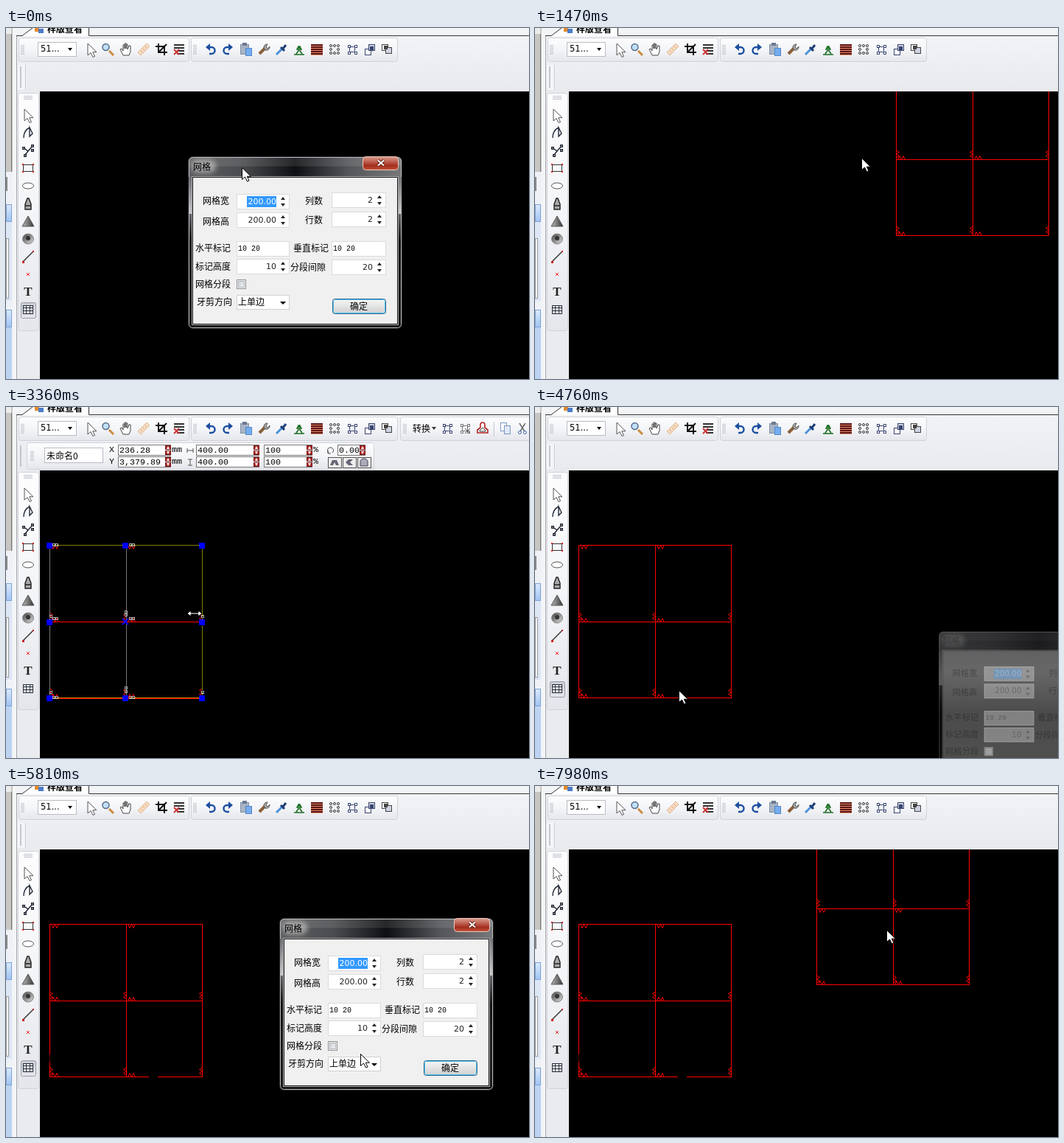
These frames come from a looping animation (710 by 476 pixels, 8 s). An HTML page with a canvas:

```html
<!DOCTYPE html>
<html lang="zh">
<head>
<meta charset="utf-8">
<style>
html, body { margin: 0; width: 100%; height: 100%; overflow: hidden; background: #000; }
canvas { display: block; }
</style>
</head>
<body>
<canvas id="stage" width="710" height="476"></canvas>
<script>
const g = document.getElementById('stage').getContext('2d');
const LOOP = 8000, STEP = 70;
const CJK = '12px "Noto Sans CJK SC", "Noto Sans CJK", sans-serif';
const NUM = '11px "DejaVu Sans", sans-serif';
const MONO = '11.7px "Liberation Mono", monospace';
const SMALL = '10px "Liberation Mono", monospace';
const RED = '#f00', BLUE = '#3399ff', INK = '#222a38';

// pointer keys: time, x, y
const KEYS = [
  [0, 320, 189], [210, 352, 290], [350, 376, 372], [490, 401, 435], [630, 450, 400],
  [770, 479, 380], [1120, 479, 380], [1260, 463, 345], [1400, 447, 260], [1470, 443, 176],
  [1680, 470, 190], [1960, 590, 263], [2030, 590, 263], [2310, 594, 177], [2380, 594, 177],
  [2940, 162, 289], [3290, 162, 289], [3360, 256, 280], [3500, 382, 269], [3780, 382, 269],
  [4200, 240, 400], [4340, 150, 419], [4550, 23, 377], [4620, 23, 377], [4760, 195, 384],
  [5040, 450, 350], [5320, 590, 312], [5390, 590, 312], [5670, 422, 194], [5810, 481, 363],
  [6160, 500, 375], [6300, 500, 375], [6580, 478, 412], [6930, 478, 412], [7350, 603, 383],
  [7770, 601, 382], [7980, 477, 195], [8000, 477, 195]
];

const clamp = v => Math.max(0, Math.min(1, v));
const span = (t, a, b) => clamp((t - a) / (b - a));
const within = (t, a, b) => t >= a && t < b;

function pointerAt(t) {
  const i = KEYS.findIndex(k => k[0] > t);
  const a = KEYS[i - 1], b = KEYS[i], f = span(t, a[0], b[0]);
  return [a[1] + (b[1] - a[1]) * f, a[2] + (b[2] - a[2]) * f].map(Math.round);
}

function box(x, y, w, h, fill, edge) {
  if (fill) { g.fillStyle = fill; g.fillRect(x, y, w, h); }
  if (edge) { g.strokeStyle = edge; g.lineWidth = 1; g.strokeRect(x + .5, y + .5, w - 1, h - 1); }
}
function round(x, y, w, h, r, fill, edge) {
  g.beginPath();
  g.roundRect(x + .5, y + .5, w - 1, h - 1, r);
  if (fill) { g.fillStyle = fill; g.fill(); }
  if (edge) { g.strokeStyle = edge; g.lineWidth = 1; g.stroke(); }
}
function blend(x0, y0, x1, y1, ...colors) {
  const b = g.createLinearGradient(x0, y0, x1, y1);
  colors.forEach((c, i) => b.addColorStop(i / (colors.length - 1), c));
  return b;
}
function text(s, x, y, font = CJK, color = '#000', align = 'left') {
  g.font = font; g.fillStyle = color; g.textAlign = align; g.textBaseline = 'middle';
  g.fillText(s, x, y);
}
// path drawn around a centre point
function path(x, y, d, edge, fill, w = 1) {
  const p = new Path2D(d);
  g.save();
  g.translate(x, y);
  if (fill) { g.fillStyle = fill; g.fill(p); }
  if (edge) { g.strokeStyle = edge; g.lineWidth = w; g.stroke(p); }
  g.restore();
}
const tri = (x, y, up, c = '#000', s = 3) =>
  path(x, y, up ? `M${-s} 2L0 -2L${s} 2Z` : `M${-s} -2L0 2L${s} -2Z`, null, c);

const ARROW = 'M0 0V16L4 12.5L7 18.5L9.5 17.5L6.8 11.7H12Z';

function panel(x, y, w, h) {
  round(x, y, w, h, 3, blend(0, y, 0, y + h, '#fdfdfe', '#f4f5f8', '#e4e6eb'), '#cfd2d9');
}
function gripV(x, y, h) {
  for (let i = 0; i < h; i += 2) box(x, y + i, 5, 1, '#c3c6ce');
}

function squares(x, y, c) {
  for (const dx of [-6, 3]) for (const dy of [-6, 3]) box(x + dx, y + dy, 4, 4, '#fff', c);
  round(x - 4, y - 4, 8, 8, 1, null, c);
}
function stack(x, y, c, flip) {
  box(x - 7, y + (flip ? -7 : -1), 9, 9, '#fff', c);
  box(x - 2, y + (flip ? -3 : -7), 9, 9, '#cdd3e0', c);
  box(x + (flip ? -4 : 0), y + (flip ? -5 : -4), 5, 5, c);
}

function topIcons() {
  path(111, 21, ARROW, '#555', '#fff');
  path(138, 29, 'M2 2L8 8', '#c98b3d', null, 3);
  path(138, 29, 'M-7 -3A4.500 4.500 0 1 1 2 -3A4.500 4.500 0 1 1 -7 -3Z', '#5a6c88', '#bfe0fa', 1.5);
  path(163, 29, 'M-4 8L-8 0L-6 -1L-4 2V-6H-2V-1V-8H0V-1V-7H2V0L4 -5H6V3L4 8Z', '#444', '#fff');
  path(187, 29, 'M-8 4L4 -8L8 -4L-4 8Z', '#e0b48c', '#f6dcc4');
  path(187, 29, 'M-4 2L-2 4M-1 -1L1 1M2 -4L4 -2', '#d8a070');
  path(211, 29, 'M-4 -8V4H8M-8 -4H4V8M-3 3L7 -7', '#111', null, 2);
  path(235, 29, 'M-7 -6H7M-7 -2H7M-3 2H7M-3 6H7', '#333', null, 2);
  path(235, 29, 'M-7 0L0 7M0 0L-7 7', '#c33', null, 2);
  path(278, 29, 'M-4 -3H1A4.500 4.500 0 0 1 1 6H-2', '#1c4fa0', null, 2.4);
  path(278, 29, 'M-7 -3L-1 -8V2Z', null, '#1c4fa0');
  path(301, 29, 'M4 -3H-1A4.500 4.500 0 0 0 -1 6H2', '#1c4fa0', null, 2.4);
  path(301, 29, 'M7 -3L1 -8V2Z', null, '#1c4fa0');
  box(318, 22, 12, 14, '#a8b4c4', '#8391a6');
  box(321, 20, 6, 4, '#6d7a90');
  box(325, 27, 9, 11, '#74aef0', '#5588c8');
  path(350, 29, 'M-6 6L2 -2', '#8a6038', null, 4);
  path(350, 29, 'M0 -2A4.500 4.500 0 0 1 5 -7L3 -3L5 -1L8 -4A4.500 4.500 0 0 1 2 1Z', '#555', '#aaa');
  path(374, 29, 'M-7 7L1 -1', '#4a90dc', null, 3);
  path(374, 29, 'M-1 -3L4 2M2 -1L6 -6', '#1d3f78', null, 3);
  path(398, 30, 'M-7 6H7M-4 5L-1 1V-5H1V1L4 5', '#176b1f', null, 1.6);
  path(398, 30, 'M-3 0A3 4 0 0 1 3 0', '#176b1f', null, 1.6);
  for (let y = 22; y < 37; y += 3) { box(414, y, 16, 2, '#5a1414'); box(414, y + 2, 16, 1, '#e38b6a'); }
  for (const dx of [-5, 0, 5]) for (const dy of [-5, 0, 5])
    if (dx || dy) round(446 + dx - 2, 29 + dy - 2, 4, 4, 2, null, '#333');
  squares(470, 29, '#38446e');
  stack(494, 29, '#38446e');
  stack(517, 29, '#444', true);
}

function sideIcons(active) {
  path(25, 110, ARROW, '#555', '#fff');
  path(30, 142, 'M-6 7C-6 -1 -2 -5 2 -7M2 -7V5L6 1Z', INK, null, 1.4);
  path(30, 166, 'M-7 -4L0 1L6 -6M0 1L-5 7', INK, null, 1.5);
  for (const [x, y] of [[22, 161], [34, 158], [34, 164], [24, 171]]) box(x, y, 4, 4, '#777', INK);
  box(23, 185, 14, 10, null, '#333');
  for (const x of [22, 36]) { box(x, 184, 2, 2, '#c22'); box(x, 194, 2, 2, '#c22'); }
  path(30, 214, 'M-7.500 0A7.500 4 0 1 1 7.500 0A7.500 4 0 1 1 -7.500 0Z', '#555', '#fff');
  path(30, 238, 'M-4 8V1L-1 -7H1L4 1V8ZM-4 3H4', '#222', '#aaa', 1.4);
  path(30, 262, 'M-8 7L0 -7L8 7Z', '#555', blend(-8, 0, 8, 0, '#bbb', '#333'));
  path(30, 286, 'M-7.500 0A7.500 7 0 1 1 7.500 0A7.500 7 0 1 1 -7.500 0Z', '#888', blend(-7, -7, 7, 7, '#444', '#ddd'));
  path(30, 285, 'M-3 0A3 3 0 1 1 3 0A3 3 0 1 1 -3 0Z', null, '#333');
  path(30, 310, 'M-7 7L7 -7', '#333', null, 1.4);
  box(22, 316, 3, 3, '#c22'); box(36, 302, 2, 2, '#c22');
  path(30, 334, 'M-2 -2L2 2M2 -2L-2 2', '#e22');
  text('T', 30, 359, 'bold 17px "Liberation Serif", serif', '#222', 'center');
  if (active) round(20, 372, 21, 22, 2, blend(0, 372, 0, 394, '#c9ccd4', '#e6e8ec'), '#999da8');
  box(23, 376, 14, 12, '#fff', INK);
  path(30, 382, 'M-7 -2.500H7M-7 1.500H7M-2.500 -6V6M2.500 -6V6', INK);
}

function chrome(active, selected) {
  box(0, 0, 710, 476, '#eaebee');
  box(14, 0, 696, 86, blend(0, 0, 0, 86, '#f3f4f7', '#e9eaee'));
  // left edge of the neighbouring pane
  box(0, 0, 9, 195, '#c8c6c2');
  box(0, 0, 7, 8, '#ececec');
  box(7, 8, 1, 188, '#777');
  box(0, 195, 9, 281, '#eef1f6');
  box(0, 202, 2, 19, '#fff', '#888');
  box(0, 239, 8, 24, blend(0, 239, 0, 263, '#dcebfd', '#9fc3f2'), '#7fa3d6');
  box(0, 263, 8, 107, '#dce6f5');
  box(0, 285, 4, 82, '#fff', '#999');
  box(0, 382, 8, 24, blend(0, 382, 0, 406, '#dcebfd', '#9fc3f2'), '#7fa3d6');
  box(0, 406, 8, 70, '#bdd3f2');
  box(9, 0, 5, 476, '#f4f5f7');
  box(14, 0, 1, 476, '#a4a6ac');
  // tab
  box(14, 0, 696, 10, '#f3f4f6');
  path(0, 0, 'M22 10.500L36 0H113V10.500Z', null, '#fff');
  path(0, 0, 'M14 10.500H22L36 0M112.500 0V10.500H710', '#333');
  box(39, 0, 6, 5, '#e58a2c');
  box(44, 1, 7, 6, '#4b7cc8');
  text('样版查看', 56, 1, 'bold ' + CJK);

  panel(17, 13, 232, 33);
  panel(251, 13, 281, 33);
  gripV(20, 23, 14);
  gripV(254, 23, 14);
  box(43, 19, 53, 20, '#fff', '#b9bcc4');
  text('51...', 47, 29, '11.5px "DejaVu Sans", sans-serif');
  tri(87, 29, false);
  topIcons();

  if (selected) selectionBars();
  else { box(16, 50, 12, 34, '#f4f5f8'); box(19, 52, 2, 29, '#c3c6ce'); box(26, 50, 1, 34, '#c3c6ce'); }

  panel(16, 88, 29, 323);
  for (let y = 92; y < 98; y += 2) box(24, y, 12, 1, '#c3c6ce');
  sideIcons(active);
  box(46, 86, 664, 390, '#000');
}

function valueField(x, y, w, s) {
  box(x, y, w + 8, 15, '#fff', '#777');
  text(s, x + 2, y + 8, MONO);
  for (const dy of [1, 8]) {
    box(x + w, y + dy, 8, 6, '#b02a2a', '#7a1717');
    tri(x + w + 4, y + dy + 3, dy === 1, '#fff', 2);
  }
}

function selectionBars() {
  panel(535, 13, 180, 33);
  gripV(539, 23, 14);
  text('转换', 552, 29);
  tri(581, 29, false, '#333');
  squares(599, 29, '#38446e');
  squares(623, 29, '#777');
  path(623, 29, 'M0 0L7 7M7 0L0 7', '#555');
  path(647, 29, 'M-7 6V2L-3 -1V-5A3 3 0 0 1 3 -5V-1L7 2V6Z', '#b32020', '#fff', 1.6);
  path(647, 29, 'M-4 4V3L0 -1L4 3V4Z', '#333');
  box(662, 20, 1, 20, '#c6c9d0');
  box(671, 21, 9, 12, '#fff', '#7d96c2');
  box(676, 25, 9, 12, '#dfe9f8', '#7d96c2');
  path(701, 29, 'M-4 -7L3 4M4 -7L-3 4', '#666', null, 1.4);
  for (const x of [695, 702]) round(x, 32, 5, 5, 2.5, null, '#3b66b0');

  panel(28, 48, 472, 37);
  box(19, 52, 2, 29, '#c3c6ce');
  gripV(33, 60, 14);
  box(52, 55, 80, 21, '#fff', '#b9bcc4');
  text('未命名0', 55, 66);
  ['X', 'Y'].forEach((s, i) => {
    const y = 51 + i * 16;
    text(s, 140, y + 7, MONO);
    valueField(152, y, 64, ['236.28', '3,379.89'][i]);
    text('mm', 225, y + 7, MONO);
    path(250, y + 8, i ? 'M-3 -4H3M-3 4H3M0 -4V4' : 'M-4 -3V3M4 -3V3M-4 0H4', '#555');
    valueField(258, y, 78, '400.00');
    valueField(350, y, 58, '100');
    text('%', 417, y + 7, MONO);
  });
  path(441, 59, 'M-3 3A4 4 0 1 1 2 3M-4 0V4H0', '#444');
  valueField(450, 51, 30, '0.00');
  for (let i = 0; i < 3; i++) box(437 + i * 20, 68, 19, 15, '#eee', '#555');
  path(446, 75, 'M-6 4L-3 -3H3L6 4H2L0 0L-2 4Z', null, '#667');
  path(466, 75, 'M5 -4H-1L-5 0L-1 4H5L1 0Z', null, '#667');
  path(486, 75, 'M-5 5V-1A5 4 0 0 1 5 -1V5Z', '#445', '#aab');
}

const GRID = 207, HALF = 103.5;
const zigH = (x, y, d) => path(x, y, `M2 0l2.500 ${5 * d}l2.500 ${-5 * d}l2.500 ${5 * d}l2.500 ${-5 * d}`, RED);
const zigV = (x, y, d) => path(x, y, `M0 -12l${4 * d} 2.500l${-4 * d} 2.500l${4 * d} 2.500l${-4 * d} 2.500`, RED);

// midDir: side of the middle line carrying the notches; coreDir: same for the centre column
function grid(x, y, midDir, coreDir) {
  const at = i => Math.round(i * HALF);
  for (let i = 0; i < 3; i++) {
    box(x + at(i), y, 1, GRID + 1, RED);
    box(x, y + at(i), GRID + 1, 1, RED);
  }
  for (let c = 0; c < 2; c++)
    [1, midDir, -1].forEach((d, r) => zigH(x + at(c) + .5, y + at(r) + .5, d));
  for (const r of [1, 2])
    [1, coreDir, -1].forEach((d, c) => zigV(x + at(c) + .5, y + at(r), d));
}

function dots(x, y, w, h, c) {
  for (let i = 0; i < Math.max(w, h); i += 2) box(x + (w ? i : 0), y + (h ? i : 0), 1, 1, c);
}

function selectedGrid(x, y) {
  grid(x, y, -1, -1);
  box(x + 104, y, 1, GRID, '#777');
  for (const [dx, dy, w, h, c] of [[0, 0, GRID, 0, '#ff0'], [0, 0, 0, GRID, '#eee'], [GRID, 0, 0, GRID, '#ff0']]) {
    box(x + dx, y + dy, w || 1, h || 1, '#000');
    dots(x + dx, y + dy, w, h, c);
  }
  box(x, y + 207, GRID, 2, RED);
  dots(x, y + 207, GRID, 0, '#ff0');
  const node = (a, b) => box(x + a, y + b, 4, 4, null, '#aaa');
  for (const c of [0, 104]) {
    for (const a of [4, 8]) { node(c + a, -2); node(c + a, 98); node(c + a, 205); }
  }
  for (const r of [89, 93, 192, 197]) node(102, r);
  for (const r of [95, 198]) { node(0, r); node(206, r); }
  for (const i of [0, 1, 2]) for (const j of [0, 1, 2])
    if (i !== 1 || j !== 1) box(x - 4 + Math.round(i * 103.3), y - 3 + Math.round(j * HALF), 8, 8, '#00f');
  path(x + 103, y + 104, 'M-4 -4L4 4M4 -4L-4 4', '#00f', null, 2);
}

function dialog(x, y, o) {
  g.save();
  g.globalAlpha = o.alpha;
  g.translate(x + 145.5, y + 117);
  g.scale(o.scale, o.scale);
  g.translate(-145.5, -117);

  round(0, 0, 291, 234, 6, blend(0, 0, 0, 234, '#5c5d60', '#8d8f92', '#0c0c0d', '#1a1a1b', '#141415'), '#222');
  round(1, 1, 289, 28, 5, blend(0, 0, 291, 0, '#5e5f62', '#4b4c4f', '#0e0f12', '#55565a', '#77787b'));
  round(1, 1, 289, 13, 5, 'rgba(255,255,255,.10)');
  round(1, 1, 289, 232, 5, null, '#b8babd');
  box(1, 28, 5, 50, blend(0, 28, 0, 78, '#6c6d70', '#c8cacc'));
  box(285, 28, 5, 50, blend(0, 28, 0, 78, '#77787b', '#c8cacc'));
  g.save();
  g.filter = 'blur(3px)';
  round(4, 4, 35, 19, 9, 'rgba(190,190,190,.7)');
  g.restore();
  text('网格', 7, 14);
  round(237, 0, 49, 19, 4, blend(0, 0, 0, 19, '#dba293', '#c3695a', '#a22d1c', '#c8573c'), '#eec9c0');
  path(262, 9, 'M-4 -3.500L4 3.500M4 -3.500L-4 3.500', '#5a1c14', null, 4);
  path(262, 9, 'M-4 -3.500L4 3.500M4 -3.500L-4 3.500', '#fff', null, 2);
  box(6, 28, 279, 200, '#f0f0f0', '#1a1a1a');
  box(5, 27, 281, 202, null, '#a9abae');

  for (const [s, lx, cy] of [
    ['网格宽', 20, 60], ['网格高', 20, 88], ['列数', 159, 60], ['行数', 159, 86],
    ['水平标记', 10, 124], ['垂直标记', 143, 124], ['标记高度', 10, 149],
    ['分段间隙', 139, 150], ['网格分段', 10, 173], ['牙剪方向', 12, 197]
  ]) text(s, lx, cy);

  const field = (fx, fy, w, h) => box(fx, fy, w, h, '#fff', '#dadbde');
  const spin = (fx, fy, w, s, marked) => {
    field(fx, fy, w, 21);
    if (marked) box(fx + 14, fy + 3, 40, 15, BLUE);
    text(s, fx + w - 18, fy + 11, NUM, marked ? '#fff' : '#222', 'right');
    tri(fx + w - 9, fy + 6, true, '#222');
    tri(fx + w - 9, fy + 15, false, '#222');
  };
  spin(66, 51, 72, '200.00', o.marked);
  spin(66, 76, 72, '200.00');
  spin(195, 49, 74, '2');
  spin(195, 75, 74, '2');
  spin(66, 139, 72, '10');
  spin(195, 140, 74, '20');
  for (const [fx, w] of [[66, 72], [195, 74]]) {
    field(fx, 115, w, 21);
    text('10 20', fx + 2, 125, SMALL);
  }
  box(66, 167, 13, 13, '#f4f4f4', '#8e8f8f');
  box(68, 169, 9, 9, blend(68, 169, 77, 178, '#ccd0d5', '#f2f3f4'), '#aeb3b9');

  box(66, 188, 72, 20, '#fff', o.comboHot ? '#7eb4ea' : '#cfd0d4');
  if (o.lower) box(68, 190, 38, 14, BLUE);
  text(o.lower ? '下单边' : '上单边', 68, 197, CJK, o.lower ? '#fff' : '#000');
  if (o.caret) box(105, 191, 1, 12, '#cc6600');
  tri(129, 199, false, '#000', 4);

  round(196, 193, 73, 21, 3, o.hot
    ? blend(0, 193, 0, 214, '#eaf6fd', '#d3ecfb', '#b4dff7', '#9fd3f2')
    : blend(0, 193, 0, 214, '#f4f4f4', '#ebebeb', '#dcdcdc', '#d0d0d0'), '#2c628b');
  round(197, 194, 71, 19, 2, null, '#4fc5f0');
  text('确定', 232, 203, CJK, '#000', 'center');

  if (o.list) {
    box(66, 208, 73, 47, '#fff', '#000');
    ['上单边', '下单边', '双边'].forEach((s, i) => {
      const on = i === o.pick;
      if (on) box(67, 209 + i * 15, 71, 15, BLUE);
      text(s, 69, 216 + i * 15, CJK, on ? '#fff' : '#000');
    });
  }
  g.restore();
}

function pointer(t, x, y) {
  if (within(t, 2310, 3360)) {
    const d = 'M0 -10L3 -6H1V-1H6V-3L10 0L6 3V1H1V6H3L0 10L-3 6H-1V1H-6V3L-10 0L-6 -3V-1H-1V-6H-3Z';
    path(x, y, d, '#000', '#fff');
  } else if (within(t, 3360, 3430)) {
    path(x, y, 'M-10 0L-5 -4V-1H5V-4L10 0L5 4V1H-5V4Z', '#000', '#fff');
  } else path(x + .5, y + .5, ARROW, '#000', '#fff');
}

function draw(t) {
  const [px, py] = pointerAt(t);
  const selected = within(t, 1960, 3710);
  chrome(t < 1120 || within(t, 4550, 7560), selected);

  g.save();
  g.beginPath();
  g.rect(46, 86, 664, 390);
  g.clip();
  if (t >= 1190) {
    const f = span(t, 2380, 2940);
    const gx = Math.round(490 - 431 * f), gy = Math.round(74 + 113 * f);
    if (selected) selectedGrid(gx, gy);
    else grid(gx, gy, -1, -1);
    if (t >= 3850) box(101, 290, 3, 1, '#000');
    if (t >= 4830) { box(194, 394, 12, 1, '#000'); box(59, 364, 1, 10, '#400'); }
  }
  if (t >= 7630) grid(382, 62, 1, 1);
  g.restore();

  const second = t > 4000;
  const shown = second ? Math.min(span(t, 4690, 4923), 1 - span(t, 7420, 7630)) : 1 - span(t, 840, 1120);
  if (shown > 0) {
    const move = span(t, 5390, 5670);
    const dx = second ? Math.round(539 - 168 * move) : 247;
    const dy = second ? Math.round(297 - 118 * move) : 174;
    const over = (x, y, w, h) => px >= dx + x && px < dx + x + w && py >= dy + y && py < dy + y + h;
    dialog(dx, dy, {
      alpha: shown,
      scale: .915 + .085 * shown,
      marked: t < 6300,
      lower: t >= 6650,
      caret: within(t, 6720, 6860) || t >= 7280,
      list: within(t, 6300, 6650),
      pick: py < 402 ? 0 : 1,
      comboHot: over(66, 188, 72, 20),
      hot: over(196, 193, 73, 21)
    });
  }
  pointer(t, px, py);
}

const start = performance.now();
let last = -1;
function tick() {
  const t = Math.floor(((performance.now() - start) % LOOP) / STEP) * STEP;
  if (t !== last) draw(last = t);
  requestAnimationFrame(tick);
}
tick();
</script>
</body>
</html>
```
